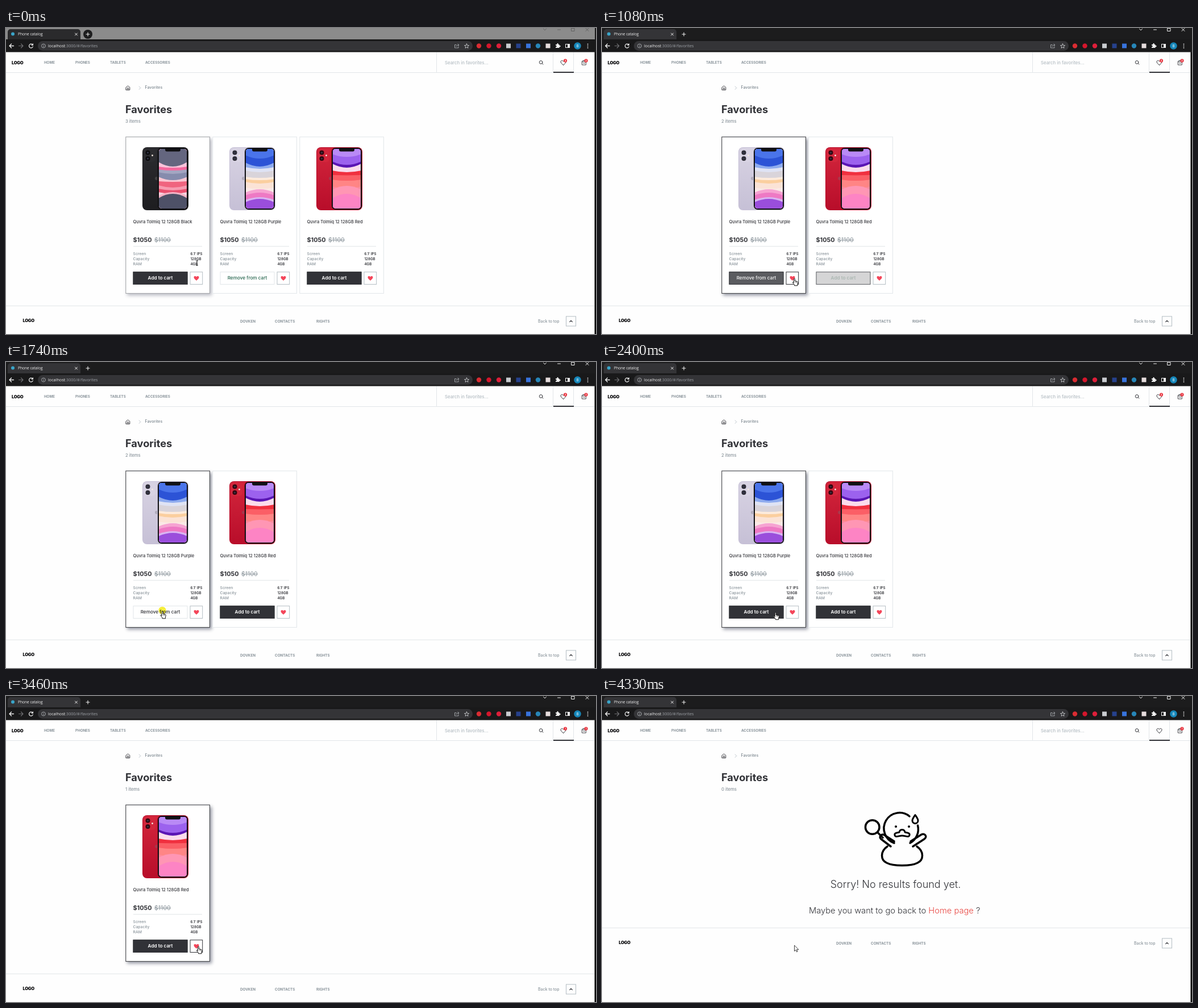
An HTML page with a canvas that plays this animation: 1038 by 539 pixels, repeating every 4730 ms.

```html
<!DOCTYPE html>
<html lang="en">
<head>
<meta charset="utf-8">
<title>Phone catalog</title>
<style>
html, body { margin: 0; width: 100%; height: 100%; overflow: hidden; background: #fff; }
canvas { display: block; }
</style>
</head>
<body>
<canvas id="stage" width="1038" height="539"></canvas>
<script>
const ctx = document.getElementById('stage').getContext('2d');
const LOOP = 4730;
const INK = '#313237', GRAY = '#89939a', PALE = '#b4bdc3', LINE = '#e2e6e9', RED = '#f4465a';

// Screen layers: colour, edge y, bulge. Positive bulges hang from the top, negative rise from the bottom.
const phones = [
  { name: 'Black', back: ['#2c2c30', '#1d1d20'], lens: '#0b0b0d', screen: '#f7d3df', layers: [
    ['#e8506f', 289, 3], ['#f79bb0', 283, 3], ['#f0647f', 277, 4], ['#fbc7d3', 270, 1],
    ['#868cad', 262, 6], ['#a3a6c2', 254, 3], ['#f4699f', 249, 2], ['#f9c3da', 244, 2], ['#64667f', 236, 8],
    ['#f4b4c6', 296, -7], ['#4e5167', 300, -8]] },
  { name: 'Purple', back: ['#d8d3e3', '#c6c0d6'], lens: '#2d2c36', screen: '#fbe9e6', layers: [
    ['#fbe3d6', 281, 2], ['#fbcf9f', 271, 3], ['#fdebdc', 266, 2], ['#d9d4da', 262, 2],
    ['#dfe3f4', 251, 3], ['#8eabee', 245, 3], ['#2c53d6', 237, 7], ['#4a74ea', 224, 6],
    ['#f6a3d2', 290, -6], ['#ee79c4', 295, -5], ['#d9b4f2', 303, -5], ['#9a4edc', 307, -6]] },
  { name: 'Red', back: ['#d3263c', '#b80d2a'], lens: '#33070f', screen: '#ff82b4', layers: [
    ['#ff8a9c', 291, 4], ['#ff8585', 279, 4], ['#fb5f66', 267, 2], ['#f0303f', 259, -.5 + 1],
    ['#fbdcec', 251, 3], ['#5a16b4', 239, 7], ['#9c62ee', 235, 6], ['#b98af6', 222, 5],
    ['#ff96b4', 285, -7], ['#fd84c4', 300, -8]] }
];

const lerp = (a, b, k) => a + (b - a) * k;
const mix = (a, b, k) => {
  const part = (hex, i) => parseInt(hex.slice(1 + 2 * i, 3 + 2 * i), 16);
  return `rgb(${[0, 1, 2].map(i => Math.round(lerp(part(a, i), part(b, i), k)))})`;
};
// Linear track through [time, value] keys.
function track(t, ...keys) {
  const i = keys.findIndex(k => k[0] > t);
  if (i === 0) return keys[0][1];
  if (i < 0) return keys[keys.length - 1][1];
  const [a, b] = [keys[i - 1], keys[i]];
  return lerp(a[1], b[1], (t - a[0]) / (b[0] - a[0]));
}

function rect(x, y, w, h, color) { ctx.fillStyle = color; ctx.fillRect(x, y, w, h); }
function frame(x, y, w, h, color) {
  ctx.strokeStyle = color; ctx.lineWidth = 1;
  ctx.strokeRect(x + .5, y + .5, w - 1, h - 1);
}
function round(x, y, w, h, r, color) {
  ctx.beginPath(); ctx.roundRect(x, y, w, h, r);
  ctx.fillStyle = color; ctx.fill();
}
function disc(x, y, r, color) {
  ctx.beginPath(); ctx.arc(x, y, r, 0, 7);
  ctx.fillStyle = color; ctx.fill();
}
function path(d, x, y, { fill, stroke, width = 1 }) {
  ctx.save(); ctx.translate(x, y);
  ctx.lineCap = ctx.lineJoin = 'round';
  const p = new Path2D(d);
  if (fill) { ctx.fillStyle = fill; ctx.fill(p); }
  if (stroke) { ctx.strokeStyle = stroke; ctx.lineWidth = width; ctx.stroke(p); }
  ctx.restore();
}
// y is the middle of the capitals; returns the x where the text ends.
function text(s, x, y, size, color, weight = 500, align = 'left', family = 'Inter') {
  ctx.font = `${weight} ${size}px ${family}, sans-serif`;
  ctx.textAlign = align; ctx.fillStyle = color;
  ctx.fillText(s, x, y + size * .36);
  return x + ctx.measureText(s).width;
}
function logo(x, y) {
  ctx.letterSpacing = '-0.3px';
  text('LOGO', x, y, 7.6, '#0f0f11', 900);
  ctx.letterSpacing = '0px';
}

const HEART = 'M0 4C-2 2.3-4.5.3-4.5-1.7C-4.5-4.4-1.3-4.9 0-2.5C1.3-4.9 4.5-4.4 4.5-1.7C4.5.3 2 2.3 0 4Z';

function browser(active) {
  const ui = (s, x, y, size, color, align) => text(s, x, y, size, color, 400, align, '"Open Sans"');
  rect(0, 0, 1038, 43, '#1a1a1b');
  rect(0, 0, 1036, 20, active ? '#1c1c1d' : '#8b8b8b');
  round(3, 2, 128, 19, [5, 5, 0, 0], active ? '#343437' : '#2a2a2c');
  rect(0, 20, 1036, 23, '#19191a');
  disc(12, 10.5, 3, '#3aa5c9');
  ui('Phone catalog', 21, 10.8, 6.6, '#f1f1f1');
  path('M-2-2L2 2M2-2L-2 2', 123.5, 11, { stroke: '#eee' });
  if (!active) disc(144, 11, 8, '#1d1d1e');
  path('M-3 0H3M0-3V3', 144, 11, { stroke: '#eee', width: 1.1 });
  const control = { stroke: active ? '#f2f2f2' : '#626262', width: 1 };
  path('M-2.5 1.5L0 4L2.5 1.5', 948, 0, control);
  path('M-2.5 3H2.5', 973, 0, control);
  path('M-2.5 .5H2.5V5.5H-2.5Z', 997.5, 0, control);
  path('M-2.5 .5L2.5 5.5M2.5 .5L-2.5 5.5', 1022.5, 0, control);

  path('M4 0H-3.5M0-3.5L-3.5 0L0 3.5', 9.5, 31.5, { stroke: '#f2f2f2', width: 1.3 });
  path('M-4 0H3.5M0-3.5L3.5 0L0 3.5', 26.5, 31.5, { stroke: '#6d6d70', width: 1.2 });
  path('M3-1.8A3.5 3.5 0 1 0 3.3 1.4M3.4-3.6V-1.3H1', 44, 31.5, { stroke: '#f2f2f2', width: 1.2 });
  round(56, 23, 765, 17, 8.5, '#343437');
  path('M3.5 0A3.5 3.5 0 1 1-3.5 0A3.5 3.5 0 1 1 3.5 0M0-.3V1.8M0-1.8V-1.7', 66, 31.5, { stroke: '#b8bbbf', width: .8 });
  ui(':3000/#/favorites', ui('localhost', 74, 31.6, 7.2, '#f1f1f1'), 31.6, 7.2, '#9da1a6');
  path('M-1-2H-3.5V3.5H3V1.5M-1 1C-1-1 1-1.5 3.5-1.5M2-3.5L4-1.5L2 .5', 793, 31.5, { stroke: '#b8bbbf', width: .8 });
  path('M0-4L1.1-1.3L4-1.1L1.8.8L2.5 3.6L0 2.1L-2.5 3.6L-1.8.8L-4-1.1L-1.1-1.3Z', 810.5, 31.8, { stroke: '#dadcdf', width: .8 });

  [[832, '#d92c32'], [849.5, '#d4162c'], [867, '#dd1f3a'], [936, '#2786b8']]
    .forEach(([x, color]) => disc(x, 31.5, 4.2, color));
  [[884, '#c9ccd0'], [901.5, '#26418c'], [919, '#3873dc'], [953.5, '#e5dcdc']]
    .forEach(([x, color]) => rect(x - 4, 27.5, 8, 8, color));
  path('M-3.5-2H-1A1.3 1.3 0 1 1 1-2H3V0A1.3 1.3 0 1 1 3 2V4H-3.5V2A1.2 1.2 0 1 0-3.5 0Z', 970.5, 31, { fill: '#f2f2f2' });
  frame(984, 28, 8, 7, '#f2f2f2');
  rect(988, 28, 4, 7, '#f2f2f2');
  disc(1005.5, 31.5, 6.2, '#1687ba');
  ui('B', 1005.5, 31.6, 6.5, '#fff', 'center');
  [28.5, 31.7, 34.9].forEach(y => disc(1023.5, y, .9, '#eee'));
}

function badge(x, y, count) {
  disc(x, y, 3.1, '#e9343f');
  text(count, x, y, 4, '#fff', 700, 'center');
}

function header(favorites, cart) {
  rect(0, 42.5, 1035.5, 496.5, '#fefefe');
  logo(10, 61.5);
  [['HOME', 67], ['PHONES', 122], ['TABLETS', 183], ['ACCESSORIES', 245]]
    .forEach(([s, x]) => text(s, x, 61, 6.2, GRAY, 700));
  rect(0, 78, 1035, 1, LINE);
  [757, 962, 998].forEach(x => rect(x, 43, 1, 36, LINE));
  rect(963, 77, 36, 2, INK);
  text('Search in favorites...', 772, 61, 7.8, PALE, 500);
  path('M2.4-.4A2.8 2.8 0 1 1-3.2-.4A2.8 2.8 0 1 1 2.4-.4M1.6 1.6L3.4 3.4', 941.5, 60.8, { stroke: INK, width: 1 });
  path(HEART, 980.5, 61.3, { stroke: INK, width: 1 });
  path('M-3.3-2H3.3V4H-3.3ZM-3.3-2L-2-3.7H2L3.3-2M-1.5 0C-1.5 2 1.5 2 1.5 0', 1017, 61, { stroke: INK, width: .9 });
  if (favorites) badge(984, 57.5, favorites);
  badge(1020.5, 57.5, cart);

  path('M-3.3-1L0-3.6L3.3-1V3.6H-3.3ZM-1.2 3.6V.3H1.2V3.6', 214.5, 105.5, { stroke: INK, width: .9 });
  path('M-1.3-2.6L1.3 0L-1.3 2.6', 235.5, 105.5, { stroke: PALE, width: .9 });
  text('Favorites', 244.5, 105, 6.9, GRAY, 600);
  text('Favorites', 210, 143, 18.2, INK, 700);
  text(favorites + ' items', 210, 164.5, 7.7, GRAY, 500);
}

function footer(y) {
  rect(0, y, 1035, 1, LINE);
  logo(29.5, y + 26.5);
  [['DOVKEN', 412], ['CONTACTS', 473], ['RIGHTS', 546]]
    .forEach(([s, x]) => text(s, x, y + 27.3, 6.3, GRAY, 700));
  text('Back to top', 936, y + 27.3, 7, GRAY, 500);
  frame(985, y + 18.5, 18, 18, PALE);
  path('M-2.4 1.2L0-1.2L2.4 1.2', 994, y + 27.5, { stroke: INK, width: 1.1 });
}

function handset(x, { back, lens, screen, layers }) {
  const body = ctx.createLinearGradient(0, 210, 0, 321);
  back.forEach((color, i) => body.addColorStop(i, color));
  round(x + 30, 210, 40, 111, 8, back[1]);
  round(x + 31, 211, 38, 109, 7, body);
  round(x + 33, 213, 20, 23, 6, back[0]);
  disc(x + 39.5, 219.5, 4, lens);
  disc(x + 39.5, 230, 4, lens);
  disc(x + 39.5, 219.5, 1.6, '#34364a');
  disc(x + 39.5, 230, 1.6, '#34364a');
  disc(x + 47.5, 224.5, 1.4, '#f3e8de');
  disc(x + 55, 265, 3, mix(back[1], '#888888', .35));

  round(x + 56, 210, 55, 111, 8, back[1]);
  round(x + 57, 211, 53, 109, 7, '#111114');
  ctx.save();
  ctx.beginPath(); ctx.roundRect(x + 59, 213, 49, 105, 5); ctx.clip();
  rect(x + 59, 213, 49, 105, screen);
  for (const [color, y, bulge] of layers) {
    const far = bulge < 0 ? 320 : 210;
    ctx.beginPath();
    ctx.moveTo(x + 58, far); ctx.lineTo(x + 58, y);
    ctx.quadraticCurveTo(x + 83.5, y + bulge * 2, x + 109, y);
    ctx.lineTo(x + 109, far);
    ctx.fillStyle = color; ctx.fill();
  }
  ctx.restore();
  round(x + 70, 212, 27, 5.5, [0, 0, 3, 3], '#111114');
}

function card(x, phone, { hover, heart, light, inCart, dim }) {
  ctx.save();
  ctx.shadowColor = `rgba(40,45,70,${.5 * Math.min(1, hover * 1.6)})`;
  ctx.shadowBlur = 6; ctx.shadowOffsetX = ctx.shadowOffsetY = 3;
  rect(x, 191.5, 149, 276.5, '#fff');
  ctx.restore();
  frame(x + .3, 191.4, 148.6, 276.5, mix(LINE, INK, hover));
  handset(x, phone);
  const left = x + 13.5;
  text(`Quvra Tolmiq 12 128GB ${phone.name}`, left, 341, 7.5, INK, 500);
  text('$1050', left, 373, 10.8, INK, 700);
  const end = text('$1100', x + 51, 373, 10.6, GRAY, 400);
  rect(x + 51, 373, end - x - 51, 1, GRAY);
  rect(x + 14, 384, 121, 1, LINE);
  [['Screen', "6.1' IPS"], ['Capacity', '128GB'], ['RAM', '4GB']].forEach(([label, value], i) => {
    text(label, left, 397.3 + i * 9.1, 6.8, GRAY, 500);
    text(value, x + 114.5, 397.3 + i * 9.1, 6.2, INK, 600);
  });
  rect(x + 13.5, 429.3, 96, 22.7, mix(INK, '#ffffff', light));
  frame(x + 13.5, 429.3, 96, 22.7, mix(INK, LINE, light ** 6));
  const label = light > .9 ? mix('#27664f', INK, dim) : mix('#ffffff', '#7d8f88', light ** 2);
  text(inCart ? 'Remove from cart' : 'Add to cart', x + 61.5, 440.5, 8.2, label, inCart ? 500 : 600, 'center');
  frame(x + 113.5, 429.3, 22.7, 22.7, mix(PALE, INK, heart));
  path(HEART, x + 125, 441, { fill: RED });
}

function emptyPage() {
  const pen = { stroke: '#000', width: 3.5 };
  path('M541 212A27.5 27.5 0 1 0 514 259M555.5 228A27.5 27.5 0 0 1 542 259', 0, 0, pen);
  path('M551 209.5C548 214 546 216.5 546 219.5A5 5 0 0 0 556 219.5C556 216.5 554 214 551 209.5Z', 0, 0, { ...pen, width: 3 });
  path('M488 231A12.3 12.3 0 1 1 463.4 231A12.3 12.3 0 1 1 488 231M484.5 240L494 249.5', 0, 0, pen);
  path('M508 265L491 252C486 248 492 242 497 245L514 256M547 265L567 252C573 248 568 241 562 244L543 256', 0, 0, pen);
  path('M502 265C489 274 490 289 501 294C513 300 543 300 555 294C566 289 567 274 554 265', 0, 0, pen);
  path('M515 245C514 241 519 241 523 240C524 234 532 234 533 240C537 241 542 241 541 245C540 250 534 246 528 246C522 246 516 250 515 245Z', 0, 0, { ...pen, width: 3 });
  disc(517, 230, 2.1, '#000');
  disc(540, 230, 2.1, '#000');
  text('Sorry! No results found yet.', 516.5, 331.5, 18, INK, 300, 'center');
  let x = text('Maybe you want to go back to ', 364, 378, 14.7, INK, 300);
  x = text('Home page', x, 378, 14.7, '#e8443f', 300);
  text(' ?', x, 378, 14.7, INK, 300);
}

function cursor(t) {
  const x = track(t, [0, 336], [70, 337], [210, 345], [480, 345], [550, 338.5], [1280, 338.5], [1540, 275],
    [2330, 275], [2530, 360], [2600, 359], [2730, 338.5]);
  const y = track(t, [0, 414], [70, 418], [210, 439.5], [1280, 439.5], [1540, 437.5], [2330, 437.5],
    [2530, 443], [2730, 439.5]);
  const clicking = [[820, 890], [1740, 1940], [3260, 3460], [4130, 4330]].some(([a, b]) => t >= a && t < b);
  if (clicking) {
    ctx.globalCompositeOperation = 'multiply';
    disc(x, y, 6.6, '#f6ee3c');
    ctx.globalCompositeOperation = 'source-over';
  }
  if (t < 70) {
    path('M-1.5-4H1.5M0-4V4M-1.5 4H1.5', x, y, { stroke: '#222', width: 1 });
  } else if (t < 140 || (t >= 2500 && t < 2660) || t >= 4330) {
    path('M0 0V10L2.3 7.8L4 11.3L5.6 10.5L4 7.2H7Z', x, y, { fill: '#fff', stroke: '#111', width: .8 });
  } else {
    path('M-1 9V2.7C-1 1.2 1 1.2 1 2.7V6L5 7C6 7.3 6.3 8 6.2 9L5.5 12V14.3H0V12.8L-3 9.2C-3.6 8-2 7.3-1 9Z',
      x, y, { fill: '#fff', stroke: '#111', width: 1 });
    path('M2.2 7V9M4 7.4V9.2', x, y, { stroke: '#111', width: .6 });
  }
}

function draw(t) {
  const removed = [1080, 3460, 4330].filter(k => t >= k).length;
  const items = phones.slice(removed);
  rect(0, 0, 1038, 539, '#050505');
  browser(t >= 890);
  header(items.length, t < 1940 ? 2 : 1);
  const hover = track(t, [0, .4], [210, 1], [2500, 1], [2600, .45], [2670, .5], [2800, 1]);
  const heart = track(t, [70, 0], [210, 1], [1350, 1], [1480, 0], [2670, 0], [2930, 1]);
  const light = {
    Black: 0,
    Purple: t < 1080 ? 1 : track(t, [1080, .2], [1350, 1], [1940, 1], [2000, 0]),
    Red: t < 1080 ? 0 : track(t, [1080, .8], [1350, 0])
  };
  const dim = track(t, [1410, 0], [1610, 1]);
  items.forEach((phone, i) => card(210 + Math.round(i * 153.2), phone, {
    hover: i ? 0 : hover,
    heart: i ? 0 : heart,
    light: light[phone.name],
    inCart: phone.name === 'Purple' && t < 1940,
    dim
  }));
  if (!items.length) emptyPage();
  footer(items.length ? 489 : 408);
  cursor(t);
}

function tick() {
  draw(performance.now() % LOOP);
  requestAnimationFrame(tick);
}
tick();
</script>
</body>
</html>
```
